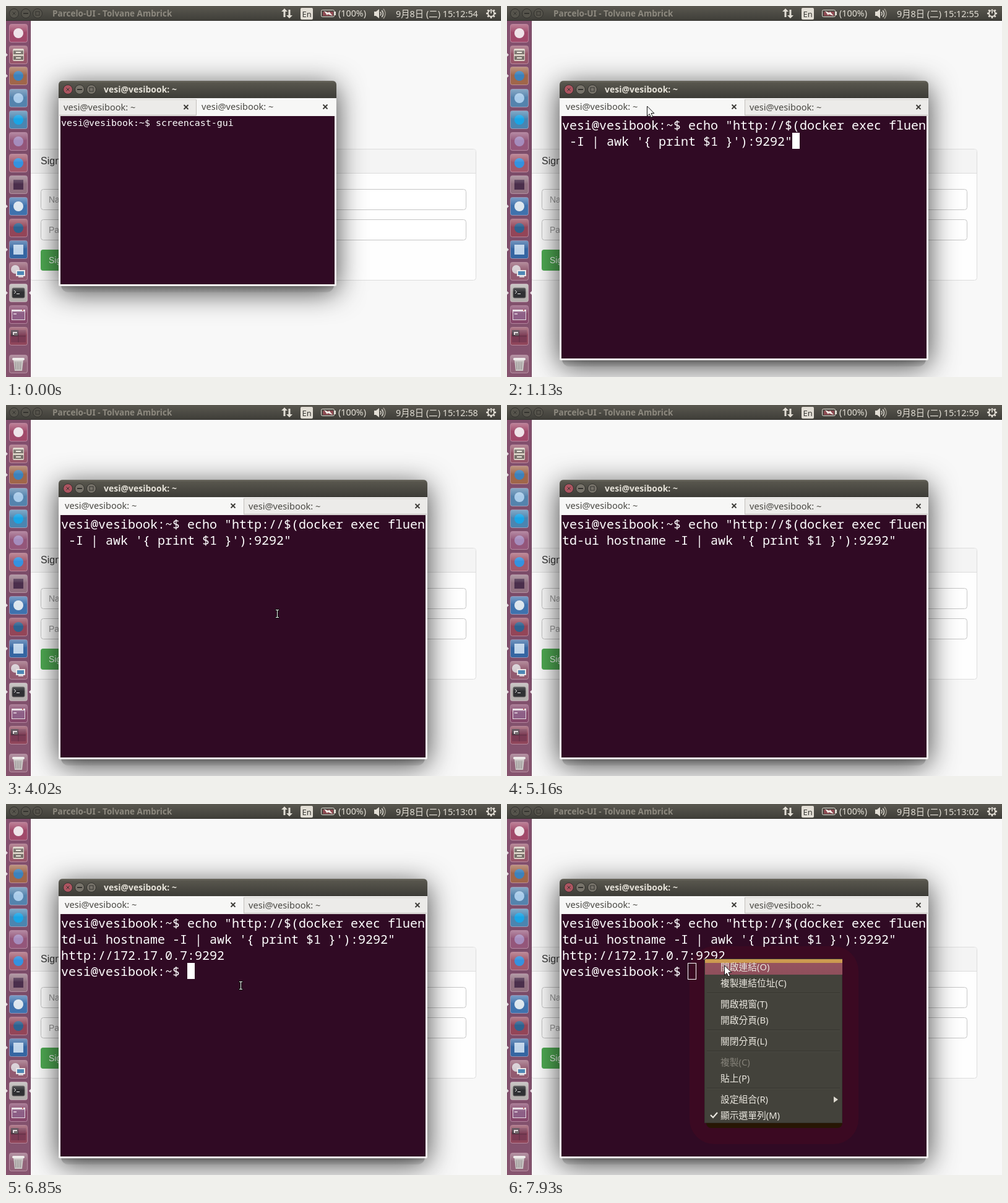
Animation, 800 px wide and 600 px high, one loop 8 s. Source, as an HTML page with a canvas:

```html
<!DOCTYPE html>
<html lang="zh-Hant">
<head>
<meta charset="utf-8">
<title>Terminal session</title>
<style>
html, body { margin: 0; width: 100%; height: 100%; overflow: hidden; background: #f8f8f8; }
canvas { display: block; }
</style>
</head>
<body>
<canvas id="stage" width="800" height="600"></canvas>
<script>
const g = document.getElementById('stage').getContext('2d');
const LOOP = 8000;
const UI = '"Noto Sans", "Noto Sans CJK TC", "Noto Sans CJK SC", "Noto Sans CJK JP", sans-serif';
const PAGE = '"Liberation Sans", sans-serif';
const SMALL = '14.95px "DejaVu Sans Mono", monospace';
const LARGE = '20px "Noto Sans Mono", monospace';
const HOST = 'vesi@vesibook';
const PROMPT = HOST + ':~$ ';
const MENU_AT = 7390;

function rect(x, y, w, h, fill) {
  g.fillStyle = fill;
  g.fillRect(x, y, w, h);
}
function round(x, y, w, h, r, fill, stroke) {
  g.beginPath();
  g.roundRect(x, y, w, h, r);
  if (fill) { g.fillStyle = fill; g.fill(); }
  if (stroke) { g.strokeStyle = stroke; g.stroke(); }
}
function disc(x, y, r, fill, stroke) {
  g.beginPath();
  g.arc(x, y, r, 0, 7);
  if (fill) { g.fillStyle = fill; g.fill(); }
  if (stroke) { g.strokeStyle = stroke; g.stroke(); }
}
function poly(points, fill, stroke) {
  g.beginPath();
  points.forEach(([x, y]) => g.lineTo(x, y));
  g.closePath();
  if (fill) { g.fillStyle = fill; g.fill(); }
  if (stroke) { g.strokeStyle = stroke; g.stroke(); }
}
function line(points, color, width = 1) {
  g.beginPath();
  points.forEach(([x, y]) => g.lineTo(x, y));
  g.strokeStyle = color;
  g.lineWidth = width;
  g.stroke();
  g.lineWidth = 1;
}
function text(s, x, y, font, color) {
  g.font = font;
  g.fillStyle = color;
  g.fillText(s, x, y);
}
function fade(y0, y1, ...colors) {
  const f = g.createLinearGradient(0, y0, 0, y1);
  colors.forEach((c, i) => f.addColorStop(i / (colors.length - 1), c));
  return f;
}

// Web page behind the terminal
function drawPage() {
  rect(0, 0, 800, 600, '#f8f8f8');
  round(38.5, 231.5, 721, 212, 4, '#fefefe', '#dddddd');
  round(39, 232, 720, 38, [3, 3, 0, 0], '#f4f4f4');
  rect(39, 270, 720, 1, '#dddddd');
  text('Sign in', 56, 256, '16px ' + PAGE, '#333');
  for (const [y, label] of [[296, 'Name'], [345, 'Password']]) {
    round(56.5, y + .5, 687, 33, 4, '#fff', '#c6c6c6');
    text(label, 69, y + 22, '14px ' + PAGE, '#999');
  }
  round(56, 394, 66, 34, 4, '#4fab53');
  text('Sign in', 69, 416, '14px ' + PAGE, '#fff');
}

function windowButtons(x, y, first, other, mark) {
  [first, other, other].forEach((fill, i) => {
    const cx = x + i * 19;
    disc(cx, y, 7.5, fill, '#33322e');
    if (i === 0) {
      line([[cx - 2.5, y - 2.5], [cx + 2.5, y + 2.5]], mark);
      line([[cx - 2.5, y + 2.5], [cx + 2.5, y - 2.5]], mark);
    } else if (i === 1) {
      rect(cx - 4, y - 1, 8, 2, mark);
    } else {
      g.strokeStyle = mark;
      g.strokeRect(cx - 3, y - 3, 6, 6);
    }
  });
}

function clockLabel(t) {
  const ticks = [260, 1320, 2270, 3270, 4260, 5260, 6230, 7180];
  const s = 54 + ticks.filter(k => t >= k).length;
  return `9月8日 (二) 15:${12 + Math.floor(s / 60)}:${String(s % 60).padStart(2, '0')}`;
}

function drawTopBar(t) {
  const ink = '#e2ded5';
  rect(0, 0, 800, 24, fade(0, 24, '#5a5850', '#3e3d38'));
  rect(0, 23, 800, 1, '#33322e');
  windowButtons(13, 12, '#56544c', '#56544c', '#34332f');
  text('Parcelo-UI - Tolvane Ambrick', 75, 17, 'bold 13.5px ' + UI, '#8d897f');

  poly([[450, 4], [455, 9], [451.5, 9], [451.5, 18], [448.5, 18], [448.5, 9], [445, 9]], ink);
  poly([[458, 20], [463, 15], [459.5, 15], [459.5, 6], [456.5, 6], [456.5, 15], [453, 15]], ink);
  round(476, 3, 20, 19, 2, ink);
  text('En', 478.5, 18, '13px ' + UI, '#3c3b37');

  round(509.5, 6.5, 21, 11, 2, '#4a4842', ink);
  rect(531, 9, 2, 6, ink);
  rect(512, 9, 17, 7, '#8d4a52');
  poly([[514, 8], [521, 11], [522, 9], [528, 16], [520, 13], [519, 15]], '#f4f1ea');
  text('(100%)', 537, 17, '14.3px ' + UI, ink);

  poly([[595, 9], [598, 9], [603, 5], [603, 20], [598, 16], [595, 16]], ink);
  for (let i = 0; i < 3; i++) {
    g.beginPath();
    g.arc(602, 12.5, 4 + i * 3.5, -.8, .8);
    g.strokeStyle = i < 2 ? ink : '#9b978c';
    g.lineWidth = 1.5;
    g.stroke();
  }
  g.lineWidth = 1;
  text(clockLabel(t), 630, 17.5, '14.4px ' + UI, ink);

  for (let i = 0; i < 8; i++) {
    const a = i * Math.PI / 4, c = Math.cos(a), s = Math.sin(a);
    line([[784 + 5 * c, 12 + 5 * s], [784 + 8 * c, 12 + 8 * s]], ink, 2.6);
  }
  g.lineWidth = 2;
  disc(784, 12, 5, '#4a4842', ink);
  g.lineWidth = 1;
  rect(782.5, 4, 3, 8, '#4a4842');
  rect(783.2, 5, 1.7, 7, ink);
}

// Small pictures on the launcher tiles, centred on (20, y)
const glyphs = {
  dot: (y, c) => disc(20, y, 8, c),
  box: (y, c) => rect(12, y - 8, 16, 16, c),
  cabinet(y) {
    round(11, y - 10, 18, 20, 2, '#d9d0c4');
    for (const dy of [-7, 2]) {
      rect(12, y + dy, 16, 6, '#77706a');
      rect(16, y + dy + 2, 8, 2, '#efe9df');
    }
  },
  screen(y) {
    disc(15, y - 3, 7, '#d5ccd2');
    rect(16, y - 2, 15, 10, '#e8e5e6');
    rect(18, y, 11, 6, '#4d86b4');
    rect(20, y + 8, 8, 2, '#d5ccd2');
  },
  shell(y) {
    round(10, y - 8, 20, 16, 2, '#2f3033', '#5b5959');
    line([[13, y - 4], [16, y - 1.5], [13, y + 1]], '#eee');
    rect(17, y + 1, 5, 1, '#eee');
  },
  pane(y) {
    rect(9, y - 8, 22, 17, '#e6dce2');
    rect(10, y - 5, 20, 13, '#8d5f86');
    rect(26, y - 8, 2, 2, '#a44');
    rect(12, y - 2, 5, 2, '#d4bccd');
  },
  spaces(y) {
    rect(8, y - 10, 24, 20, '#7b3b54');
    rect(8, y - 10, 12, 10, '#463540');
    rect(11, y - 7, 7, 5, '#dcd5d8');
    rect(13, y - 5, 6, 4, '#6b6265');
    line([[20, y - 10], [20, y + 10]], '#5d3045');
    line([[8, y], [32, y]], '#5d3045');
  },
  bin(y) {
    poly([[12, y - 7], [28, y - 7], [26, y + 11], [14, y + 11]], '#c9c6c4');
    for (let x = 15; x < 27; x += 3) line([[x, y - 4], [x + (20 - x) * .15, y + 9]], '#8f8a8a');
    round(10, y - 10, 20, 4, 2, '#ebe8e6');
  }
};

const tiles = [
  [44, '#a1496a', 'dot', '#efe3e8'],
  [79, '#98566a', 'cabinet'],
  [113, '#a0664a', 'dot', '#3d82bb'],
  [149, '#5483ad', 'dot', '#a8cbea'],
  [184, '#4b85b0', 'dot', '#19a5e6'],
  [219, '#94567a', 'dot', '#a58cbd'],
  [254, '#a1586c', 'dot', '#3592df'],
  [289, '#917080', 'box', '#4b2f4c'],
  [324, '#3f72ad', 'dot', '#dce6ee'],
  [359, '#934558', 'dot', '#2e628f'],
  [394, '#3566a2', 'box', '#bfd4ea'],
  [429, '#925a70', 'screen'],
  [464, '#b4b0ae', 'shell'],
  [499, '#85466a', 'pane'],
  [534, '#8f465b', 'spaces'],
  [579, '#92647a', 'bin']
];

function drawLauncher() {
  rect(0, 24, 40, 576, fade(24, 600, '#84506e', '#7a4b68', '#86546f'));
  rect(39, 24, 1, 576, 'rgba(50,20,40,.25)');
  for (const [y, color, kind, tint] of tiles) {
    round(5.5, y - 14.5, 29, 29, 3, color, 'rgba(255,225,240,.38)');
    glyphs[kind](y, tint);
    round(6, y - 14, 28, 12, 3, fade(y - 14, y - 2, 'rgba(255,255,255,.3)', 'rgba(255,255,255,.04)'));
  }
  for (const y of [79, 113, 324, 394, 464]) poly([[0, y - 3], [3, y], [0, y + 3]], '#e6dce2');
  poly([[40, 461], [37, 464], [40, 467]], '#e6dce2');
}

function drawFrame(w, h, split, leftActive) {
  const x = 85, y = 121, bottom = y + h;
  g.save();
  g.shadowColor = 'rgba(0,0,0,.75)';
  g.shadowBlur = 46;
  g.shadowOffsetY = 9;
  round(x, y, w, h, 6, '#777');
  g.restore();
  round(x + 4, bottom - 20, w - 8, 30, 12, fade(bottom, bottom + 10, 'rgba(60,60,60,.4)', 'rgba(110,110,110,.2)'));
  round(x, y, w, h, [6, 6, 2, 2], '#f2f1f0');
  round(x, y, w, 28, [6, 6, 0, 0], fade(y, y + 28, '#5b5950', '#3d3c37'));
  rect(x + 5, y + 1, w - 10, 1, '#6d6a60');
  windowButtons(100, 135, '#ad5561', '#77736a', '#33322e');
  text(HOST + ': ~', 158, 140, 'bold 14px ' + UI, '#e6e2d9');

  const tab = (x0, x1, tx, cx, active) => {
    const lift = active ? 0 : 1;
    round(x0, 150 + lift, x1 - x0, 28 - lift, [4, 4, 0, 0], active ? '#f7f7f6' : '#ecebe9');
    line([[x0, 150.5 + lift], [x1, 150.5 + lift]], active ? '#fff' : '#d6d3d0');
    if (!active) line([[x0, 176.5], [x1, 176.5]], '#c3c0bc');
    text(HOST + ': ~', tx, 168 + lift, '14.6px ' + UI, '#4a4944');
    const cy = 163 + lift * .5;
    line([[cx - 3.5, cy - 3.5], [cx + 3.5, cy + 3.5]], '#3c3b37', 1.8);
    line([[cx - 3.5, cy + 3.5], [cx + 3.5, cy - 3.5]], '#3c3b37', 1.8);
  };
  const pad = leftActive ? 10 : 8;
  tab(x + 1, split, x + pad, split - (leftActive ? 17 : 16), leftActive);
  tab(split, x + w - 1, split + (leftActive ? 8 : 9), x + w - (leftActive ? 16 : 18), !leftActive);
  line([[split + .5, 151], [split + .5, 177]], '#c3c0bc');
  rect(88, 178, w - 6, h - 60, '#300a24');
}

function drawRows(rows, font, step, rise) {
  rows.forEach((s, i) => text(s, 89, 180 + i * step + rise, font, '#fff'));
}
const within = (t, spans) => spans.some(([a, b]) => t >= a && t < b);

function drawSmall(t) {
  drawFrame(449, 332, 307, false);
  const rows = [PROMPT + 'screencast-gui'];
  if (t >= 40) rows.push('Recording starts. Will record 30 seconds...');
  drawRows(rows, SMALL, 18, 14);
  if (t >= 300 && t < 850) rect(89, 216, 9, 18, '#fff');
}

function drawLarge(t) {
  drawFrame(596, 452, 384, true);
  drawMenuGlow(t);
  const tail = "-I | awk '{ print $1 }'):9292\"";
  const rows = [PROMPT + 'echo "http://$(docker exec fluen'];
  rows.push(t < 5120 ? ' ' + tail : 'td-ui hostname ' + tail);
  if (t >= 5210) rows.push('http://172.17.0.7:9292');
  if (t >= 5260) rows.push(PROMPT);
  drawRows(rows, LARGE, 26, 20);

  if (t >= MENU_AT) {
    g.strokeStyle = '#fff';
    g.strokeRect(292.5, 257.5, 13, 26);
  } else if (within(t, [[1090, 1670], [2240, 2830], [3420, 4020], [4620, 5120], [5260, 5710], [6320, 6930]])) {
    if (t < 5120) rect(461, 205, 12, 26, '#fff');
    else rect(293, 257, 12, 26, '#fff');
  }
  const p = pointerAt(t);
  if (p && t > 6530 && t < MENU_AT && p.x < 353 && p.y < 257) rect(89, 254, 264, 1, '#fff');
}

// Label and centre line of each context menu entry
const entries = [
  ['開啟連結(O)', 264], ['複製連結位址(C)', 290], ['開啟視窗(T)', 324],
  ['開啟分頁(B)', 350], ['關閉分頁(L)', 384], ['複製(C)', 418],
  ['貼上(P)', 444], ['設定組合(R)', 478], ['顯示選單列(M)', 504]
];

// Reddish halo that lies under the terminal text
function drawMenuGlow(t) {
  if (t < MENU_AT) return;
  const grow = 12 * Math.min(1, Math.max(0, (t - 7430) / 80));
  round(307 - grow, 242 - grow, 249 + 2 * grow, 296 + 2 * grow, 28 + grow, '#3b0922');
}

function drawMenu(t) {
  if (t < MENU_AT) return;
  g.save();
  g.globalAlpha = Math.min(1, t < 7430 ? .08 + (t - MENU_AT) / 280 : .22 + (t - 7430) * .01);
  round(322, 500, 220, 24, 8, '#271604');
  rect(319, 250, 223, 266, '#43423b');
  g.strokeStyle = '#37362f';
  g.strokeRect(319.5, 250.5, 222, 265);
  if (t >= 7850) {
    rect(320, 251, 222, 25, fade(251, 276, '#98545f', '#8f4f5c'));
    rect(320, 251, 222, 6, '#cc9a50');
  }
  for (const y of [306, 366, 400, 460]) {
    rect(323, y - 1, 215, 1, '#35342f');
    rect(323, y, 215, 1, '#4b4a43');
  }
  entries.forEach(([label, y], i) => {
    text(label, 345, y + 5, '14.75px ' + UI, i === 5 ? '#858279' : '#ebe8e0');
  });
  poly([[528, 473], [535, 478], [528, 483]], '#dedad0');
  line([[329, 503], [333, 507], [340, 499]], '#ebe8e0', 2.2);
  g.restore();
}

const path = [
  [260, 236, 212], [420, 232, 200], [750, 232, 200], [910, 226, 162],
  [1670, 226, 162], [2280, 438, 337], [6530, 438, 337], [7180, 318, 248],
  [7810, 318, 248], [7930, 351, 261]
];
function pointerAt(t) {
  if (t < 260 || (t >= 5140 && t < 6530)) return null;
  const i = path.findIndex(k => k[0] > t);
  if (i < 0) {
    const [, x, y] = path[path.length - 1];
    return { x, y };
  }
  const [t0, x0, y0] = path[i - 1], [t1, x1, y1] = path[i];
  const u = (t - t0) / (t1 - t0), e = u * u * (3 - 2 * u);
  return { x: x0 + (x1 - x0) * e, y: y0 + (y1 - y0) * e };
}

function drawPointer(t) {
  const p = pointerAt(t);
  if (!p) return;
  const x = Math.round(p.x), y = Math.round(p.y);
  const onLink = t > 6530 && x < 353 && y < 257;
  if (y > 178 && t < MENU_AT && !onLink) {
    rect(x - 3, y - 7, 7, 3, '#111');
    rect(x - 3, y + 5, 7, 3, '#111');
    rect(x - 1, y - 6, 3, 13, '#111');
    rect(x - 2, y - 6, 5, 1, '#eee');
    rect(x - 2, y + 6, 5, 1, '#eee');
    rect(x, y - 6, 1, 13, '#eee');
    return;
  }
  const shape = [[0, 0], [0, 16], [3.7, 12.6], [6.2, 18.2], [9, 17], [6.5, 11.5], [11.3, 11.5]];
  poly(shape.map(([a, b]) => [x + a + .5, y + b]), '#fff', '#111');
}

function draw(t) {
  drawPage();
  if (t < 1090) drawSmall(t);
  else drawLarge(t);
  drawLauncher();
  drawTopBar(t);
  drawMenu(t);
  drawPointer(t);
}

const start = performance.now();
function tick() {
  draw((performance.now() - start) % LOOP);
  requestAnimationFrame(tick);
}
tick();
</script>
</body>
</html>
```
